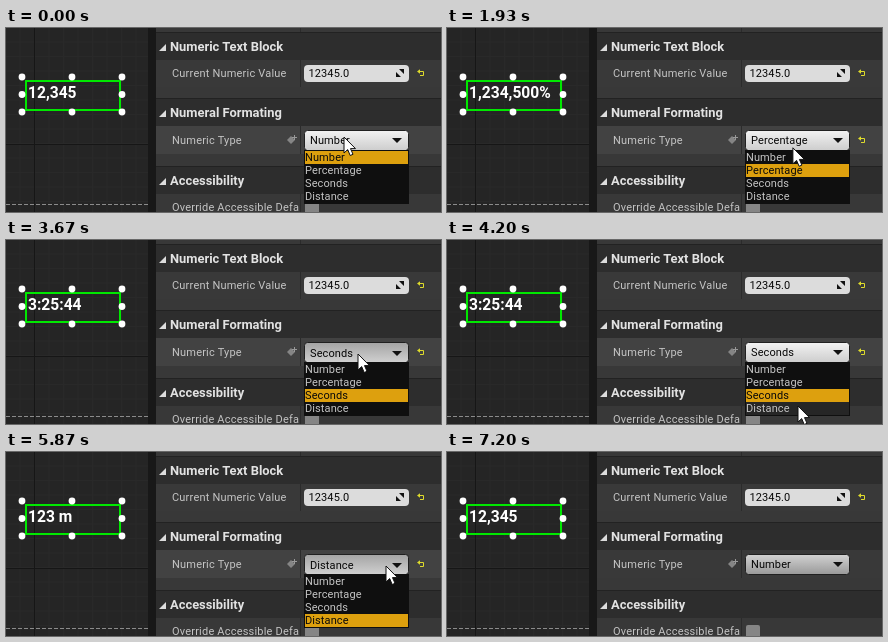
Recreate the animation shown at these times as an HTML page. Size 435 by 184 pixels, loop 8.19 s.

```html
<!DOCTYPE html>
<html lang="en">
<head>
<meta charset="utf-8">
<title>Numeric text block</title>
<style>
  html, body { margin: 0; width: 100%; height: 100%; overflow: hidden; background: #383838; }
  svg { display: block; width: 435px; height: 184px; }
  text { font: 11px Roboto, sans-serif; letter-spacing: .1px; fill: #c4c4c4; white-space: pre; }
  .labels text { letter-spacing: .2px; }
  .title { font-weight: 700; font-size: 12.9px; letter-spacing: 0; fill: #e2e2e2; }
  .dark { fill: #080808; }
  #value { font-weight: 700; font-size: 15.6px; letter-spacing: 0; fill: #fff; }
  .header { fill: #2d2d2d; }
  .header.hover { fill: #1b1b1b; }
  .row { fill: #393939; }
  .row.hover { fill: #424242; }
  #combo rect { fill: url(#button); }
  #combo.hover rect { fill: url(#buttonHover); }
  #combo.pressed rect { fill: url(#buttonPressed); }
  #combo.pressed .face { transform: translateY(1px); }
  .option rect { fill: none; }
  .option.hover rect { fill: #262626; }
  .option.chosen rect { fill: #dda00e; }
  .option.chosen text { fill: #0a0a0a; }
  .hidden { visibility: hidden; }
</style>
</head>
<body>
<svg viewBox="0 0 435 184">
  <defs>
    <pattern id="grid" width="14.5" height="14.5" patternUnits="userSpaceOnUse" x="-1" y="-1">
      <path d="M.5 0V14.5M0 .5H14.5" stroke="#292929" fill="none"/>
    </pattern>
    <linearGradient id="button" x2="0" y2="1">
      <stop stop-color="#d2d2d2"/><stop offset="1" stop-color="#999"/>
    </linearGradient>
    <linearGradient id="buttonHover" x2="0" y2="1">
      <stop stop-color="#f2f2f2"/><stop offset="1" stop-color="#cdcdcd"/>
    </linearGradient>
    <linearGradient id="buttonPressed" x2="0" y2="1">
      <stop stop-color="#a4a4a4"/><stop offset="1" stop-color="#d0d0d0"/>
    </linearGradient>
    <clipPath id="labelColumn"><path d="M150 0H294V184H150Z"/></clipPath>
    <path id="expanded" d="M7 0V7H0Z" fill="#dcdcdc"/>
    <g id="reset" fill="none" stroke="#dedb2c">
      <path d="M1.5 2.5H6.5V6.5H3"/><path d="M3 .2V4.8L0 2.5Z" fill="#dedb2c" stroke="none"/>
    </g>
  </defs>

  <!-- designer viewport -->
  <rect width="142" height="184" fill="#252525"/>
  <rect width="142" height="184" fill="url(#grid)"/>
  <path d="M28.5 0V184M0 116.5H142" stroke="#161616"/>
  <path d="M0 176.5H142" stroke="#8b8b8b" stroke-dasharray="4 2"/>
  <rect x="20" y="53" width="94" height="29" fill="none" stroke="#00e800" stroke-width="2"/>
  <g id="handles" fill="#fff"></g>
  <text id="value" x="22" y="70"></text>
  <rect x="142" width="8" height="184" fill="#181818"/>

  <!-- details panel -->
  <rect x="150" width="285" height="184" fill="#383838"/>
  <rect class="row" x="150" y="32" width="285" height="27"/>
  <rect class="row" id="typeRow" x="150" y="98" width="285" height="28"/>
  <path d="M294.5 0V5M294.5 32V59M294.5 98V126M294.5 166V184" stroke="#2b2b2b"/>
  <g id="headers"></g>
  <g class="labels" clip-path="url(#labelColumn)">
    <text x="166" y="49">Current Numeric Value</text>
    <text x="166" y="116">Numeric Type</text>
    <text x="166" y="183">Override Accessible Defa</text>
  </g>
  <rect x="299" y="173" width="14" height="14" rx="2" fill="#858585"/>

  <rect x="298" y="37" width="105" height="17" rx="4" fill="#dcdcdc"/>
  <text class="dark" x="302.5" y="49">12345.0</text>
  <path d="M393 41H398V46ZM390 44V49H395Z" fill="#111"/>
  <use href="#reset" x="411" y="41"/>

  <g fill="#858585">
    <path d="M285 108L289 112 285 116 281 112Z"/>
    <path d="M288.5 107V112M286 109.5H291" stroke="#999"/>
  </g>
  <g id="combo">
    <rect x="298.5" y="102.5" width="104" height="20" rx="3" stroke="#202020"/>
    <g class="face">
      <text id="choice" class="dark" x="304" y="116"></text>
      <path d="M386 110H396L391 115Z" fill="#111"/>
    </g>
  </g>
  <use id="typeReset" href="#reset" x="411" y="108"/>

  <g id="menu">
    <rect x="298" y="122" width="105" height="54" fill="#0f0f0f"/>
  </g>
  <path id="cursor" d="M0 0V16L3.7 12.6 6.2 18.5 9 17.3 6.5 11.6H11.5Z" fill="#fff" stroke="#111"/>
</svg>
<script>
const LOOP = 8190, STEP = 1000 / 15;
const OPTIONS = ['Number', 'Percentage', 'Seconds', 'Distance'];
const VALUES = ['12,345', '1,234,500%', '3:25:44', '123 m'];

// [time, x, y] of the pointer tip
const PATH = [
  [0, 338, 109], [530, 336, 142], [800, 337, 142], [935, 337, 142], [1000, 337, 140],
  [1600, 346, 117], [1867, 346, 117], [2267, 345, 155], [2934, 345, 155],
  [3533, 352, 114], [3800, 352, 114], [4200, 351, 166], [4600, 351, 166],
  [4867, 397, 161], [5130, 421, 150], [5400, 422, 138], [5600, 380, 114],
  [6067, 380, 114], [6533, 370, 128], [6934, 370, 128], [7200, 440, 112]
];
// [time, chosen option, menu open]
const STATES = [
  [-200, 0, true], [667, 1, false], [1733, 1, true], [2667, 2, false],
  [3667, 2, true], [4600, 3, false], [5867, 3, true], [7000, 0, false]
];
const PRESS = 60, RELEASE = 130;

const $ = id => document.getElementById(id);
function add(parent, tag, attrs, text = '') {
  const el = document.createElementNS('http://www.w3.org/2000/svg', tag);
  for (const name in attrs) el.setAttribute(name, attrs[name]);
  el.textContent = text;
  return parent.appendChild(el);
}

for (const x of [16, 66, 116])
  for (const y of [49, 66.5, 84])
    if (x !== 66 || y !== 66.5) add($('handles'), 'circle', { cx: x, cy: y, r: 3.4 });

const headers = [['Numeric Text Block', 5], ['Numeral Formating', 71], ['Accessibility', 139]].map(([title, y]) => {
  const bar = add($('headers'), 'rect', { class: 'header', x: 150, y, width: 285, height: 27 });
  add($('headers'), 'path', { d: `M150 ${y - .5}H435`, stroke: '#222' });
  add($('headers'), 'use', { href: '#expanded', x: 153, y: y + 11 });
  add($('headers'), 'text', { class: 'title', x: 164, y: y + 18 }, title);
  return bar;
});

const items = OPTIONS.map((name, i) => {
  const item = add($('menu'), 'g', { class: 'option' });
  add(item, 'rect', { x: 299, y: 123 + 13 * i, width: 103, height: 13 });
  add(item, 'text', { x: 299, y: 133 + 13 * i }, name);
  return item;
});

function pointerAt(t) {
  const next = PATH.findIndex(key => key[0] > t);
  if (next < 0) return PATH[PATH.length - 1].slice(1);
  const [t0, x0, y0] = PATH[next - 1], [t1, x1, y1] = PATH[next];
  const u = (t - t0) / (t1 - t0), k = u * u * (3 - 2 * u);
  return [x0 + (x1 - x0) * k, y0 + (y1 - y0) * k];
}

function draw(t) {
  const [x, y] = pointerAt(t);
  const [since, chosen, open] = STATES.filter(s => s[0] <= t + 1).pop();
  const free = !open && t - since >= RELEASE;
  const inside = (top, bottom) => x < 435 && y >= top && y < bottom;

  $('cursor').setAttribute('transform', `translate(${x.toFixed(1)} ${y.toFixed(1)})`);
  $('value').textContent = VALUES[chosen];
  $('choice').textContent = OPTIONS[chosen];
  $('typeReset').classList.toggle('hidden', chosen === 0);
  $('menu').classList.toggle('hidden', !open);
  $('typeRow').classList.toggle('hover', open || free && inside(98, 126));
  $('combo').classList.toggle('hover', open || free && x < 403 && inside(102, 123));
  $('combo').classList.toggle('pressed', open && t - since < PRESS);
  headers[2].classList.toggle('hover', free && inside(139, 166));
  items.forEach((item, i) => {
    item.classList.toggle('chosen', i === chosen);
    item.classList.toggle('hover', i !== chosen && inside(123 + 13 * i, 136 + 13 * i));
  });
}

const start = performance.now();
function tick() {
  const t = Math.max(0, performance.now() - start) % LOOP;
  draw(Math.floor((t + 4) / STEP) * STEP);
  requestAnimationFrame(tick);
}
tick();
</script>
</body>
</html>
```
